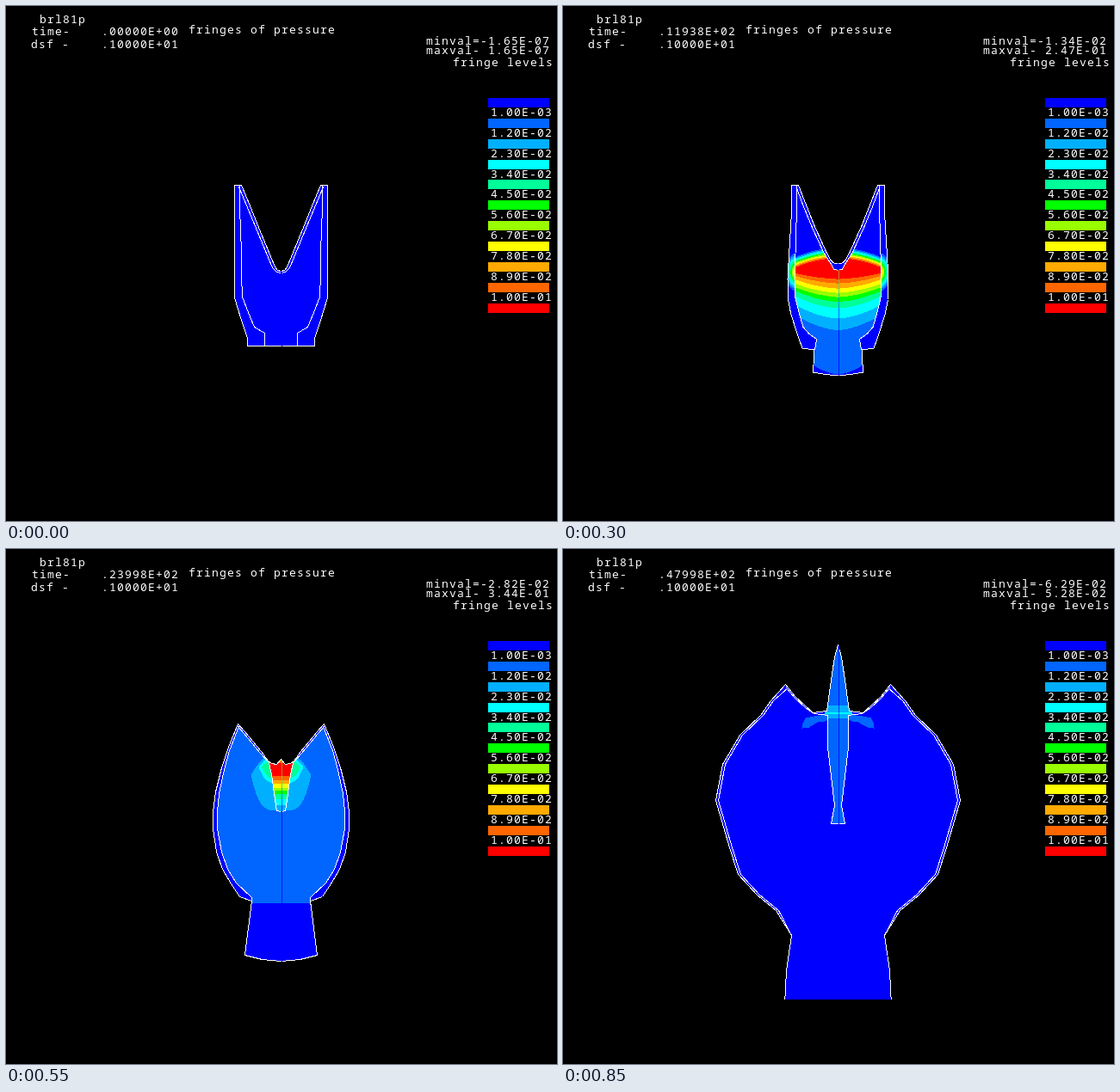
Animation, 640 px wide and 599 px high, one loop 0.9 s. Source, as an HTML page:

```html
<!DOCTYPE html>
<html lang="en">
<head>
<meta charset="utf-8">
<title>Fringes of pressure</title>
<style>
  html, body { margin: 0; width: 100%; height: 100%; overflow: hidden; background: #000; }
  svg { display: block; }
  text { font: 13px "Noto Sans Mono", "DejaVu Sans Mono", monospace; letter-spacing: 1.2px; fill: #fff; white-space: pre; }
  .line { fill: none; stroke: #fff; stroke-width: 1; }
</style>
</head>
<body>
<svg width="640" height="599" viewBox="0 0 640 599">
  <defs>
    <clipPath id="stage"><rect width="640" height="524"/></clipPath>
    <clipPath id="bodyClip"><path id="bodyEdge"/></clipPath>
    <clipPath id="chargeClip"><path id="chargeEdge"/></clipPath>
    <clipPath id="jetClip"><path id="jetEdge"/></clipPath>
  </defs>
  <g clip-path="url(#stage)" shape-rendering="crispEdges">
    <g transform="translate(319.5 .5)">
      <g id="half">
        <path id="body" fill="#00f"/>
        <g id="spot" clip-path="url(#bodyClip)"></g>
        <path id="charge" fill="#00f"/>
        <g id="bands" clip-path="url(#chargeClip)"></g>
        <g id="jet" clip-path="url(#jetClip)"></g>
        <path id="lines" class="line"/>
      </g>
      <use href="#half" transform="scale(-1 1)"/>
    </g>
  </g>
  <g id="legend"></g>
  <text x="39" y="20">brl81p</text>
  <text x="30" y="34">time-</text>
  <text x="111" y="34" id="time"></text>
  <text x="29" y="49">dsf -</text>
  <text x="111" y="49">.10000E+01</text>
  <text x="212" y="32">fringes of pressure</text>
  <text x="488" y="45" id="min"></text>
  <text x="488" y="56" id="max"></text>
  <text x="519" y="70">fringe levels</text>
</svg>
<script>
const $ = id => document.getElementById(id);
const colors = ['#00f', '#06f', '#00b0ff', '#0ff', '#00ff99', '#0f0', '#9f0', '#ff0', '#fa0', '#f60', '#f00'];
const none = Array(10).fill(150);
const flat = y => Array(10).fill(y);

// Case wall pushed inwards, ends kept on the wall
const inset = (p, g) => p.map((v, i) => i > p.length - 3 ? v : i === 1 ? v + g + 1 : i % 2 ? v : v - g);

// Key poses, 8 time units apart; points are (distance from axis, y).
// up: front [y, step per level, drop at edge]; low, edge: rear of each level on axis and at the wall
// jetUp, jetLow: the same for the jet
const keys = [];
const key = (shape, field) => keys.push({ ...shape, ...field });

const zone24 = [60,200, 75,240, 85,275, 85,295, 85,318, 85,337, 80,353, 75,371, 70,385, 45,411, 25,411, -1,412];
const cone = {
  top: [46,208, 36,232, 26,257, 19,274, 12,291, 7,303, 4,307, 0,308],
  slug: [49,210, 39,234, 29,258, 22,275, 15,292, 10,304, 7,307, 5,309, 0,310],
  zone: zone24, jetUp: [285, 0], jetLow: none
};

key({
  out: [54,208, 54,234, 54,260, 54,286, 54,312, 54,339, 50,352, 46,365, 39,386, 39,395, 19,395],
  wall: [48,208, 48,234, 47,260, 46,286, 46,312, 45,338, 38,356, 31,373, 24,377, 19,380, 19,395],
  tail: [19,395, 19,395, 10,395, 0,395], ...cone
}, {
  up: [397, 1, 6], pow: 2, spot: [30, 395, 0, 0],
  low: [430,425,423,420,418,416,414,412,411,410], edge: [430,425,423,420,418,416,414,412,411,410],
  info: [0, -1.65e-7, 1.65e-7]
});

key({
  out: [54,208, 54,234, 54,260, 54,286, 54,312, 54,339, 51,352, 48,364, 43,385, 40,396, 25,396],
  wall: [48,208, 48,234, 47,260, 46,286, 45,312, 44,338, 39,357, 35,374, 28,378, 23,381, 25,396],
  tail: [25,403, 25,410, 13,412, 0,413], ...cone
}, {
  up: [313, 1.4, 14], pow: 2, spot: [46, 350, 9, 15],
  low: [430,386,381,372,367,363,359,354,352,350], edge: [430,383,378,369,364,360,356,351,349,347],
  info: [7.9325, -1.45e-2, .157]
});

key({
  out: [54,208, 54,245, 57,270, 60,293, 63,322, 62,343, 59,361, 54,375, 48,388, 43,399, 30,403],
  wall: [48,208, 48,245, 51,270, 53,290, 56,322, 55,340, 51,358, 46,372, 39,384, 27,393, 29,403],
  tail: [31,420, 34,441, 17,444, 0,446],
  top: [46,208, 38,230, 29,253, 22,267, 16,279, 10,287, 6,290, 0,290],
  slug: [48,210, 41,232, 32,254, 25,268, 18,281, 9,291, 7,296, 5,302, 0,304]
}, {
  zone: zone24, up: [246, 1.3, 10], pow: 1.4, spot: [51, 268, 8, 14],
  low: [426,367,345,330,320,313,307,302,292,284], edge: [365,330,313,302,295,291,287,282,276,272],
  jetUp: [286, 0], jetLow: flat(304),
  info: [15.944, -1.22e-2, .337]
});

key({
  out: [50,203, 61,230, 69,254, 76,282, 79,305, 79,325, 75,352, 68,372, 58,389, 48,404, 34,409],
  wall: [49,206, 60,234, 66,256, 72,284, 74,305, 74,325, 69,352, 62,372, 52,388, 34,405, 34,409],
  tail: [38,440, 42,472, 22,477, 0,479],
  top: [50,203, 42,212, 33,223, 23,235, 15,246, 11,249, 5,250, 0,244],
  slug: [50,206, 43,214, 34,225, 24,237, 14,248, 11,262, 6,298, 5,304, 0,305]
}, {
  zone: zone24, up: [224, 4, 70], pow: 4, spot: [60, 230, 0, 0],
  low: [412,304,272,267,240,240,240,240,240,240], edge: [412,83,-70,-150,100,100,100,100,100,100],
  jetUp: [236, 1.2], jetLow: [330,306,297,290,284,280,277,272,268,263],
  info: [23.998, -2.82e-2, .344]
});

const out32 = [51,187, 63,203, 79,225, 92,257, 99,288, 100,313, 96,340, 88,368, 76,390, 56,412, 39,420];
key({
  out: out32, wall: inset(out32, 4),
  tail: [45,455, 50,505, 27,511, 0,513],
  top: [51,187, 45,197, 36,206, 24,213, 14,219, 8,217, 3,210, 0,198],
  slug: [50,190, 44,201, 36,209, 24,216, 15,220, 10,250, 5,293, 6,306, 0,307]
}, {
  zone: [36,208, 68,245, 85,275, 87,295, 74,318, 80,337, 57,353, 57,371, 74,375, 48,402, 36,391, -1,386],
  up: [199, 3, 85], pow: 4, spot: [60, 230, 0, 0],
  low: [386,236,230,226,150,150,150,150,150,150], edge: [386,-100,-300,-400,100,100,100,100,100,100],
  jetUp: [196, 2], jetLow: [330,300,262,246,240,236,234,231,228,225],
  info: [31.985, -6.17e-2, .165]
});

const gone = { up: [300, 0, 0], pow: 4, spot: [60, 230, 0, 0], low: none, edge: none };
const out40 = [55,171, 70,190, 85,208, 104,234, 116,262, 121,300, 112,343, 107,367, 91,394, 66,414, 47,433];
key({
  out: out40, wall: inset(out40, 3),
  tail: [51,470, 57,538, 30,546, 0,549],
  top: [55,171, 47,183, 37,195, 25,198, 15,200, 9,189, 3,169, 0,154],
  slug: [54,175, 46,187, 37,197, 25,200, 15,202, 11,235, 4,295, 8,313, 0,314]
}, {
  zone: [20,203, 40,208, 50,220, 53,240, 50,255, 53,264, 46,274, 36,280, 25,283, 18,283, 8,275, -1,270],
  ...gone, jetUp: [160, 8], jetLow: [330,248,225,206,202,150,150,150,150,150],
  info: [39.995, -9.17e-2, 5.69e-2]
});

const out48 = [61,157, 78,176, 90,193, 114,216, 134,250, 142,292, 126,347, 116,378, 94,402, 72,420, 54,449];
key({
  out: out48, wall: inset(out48, 3),
  tail: [60,490, 64,570, 33,578, 0,582],
  top: [61,157, 50,171, 38,182, 29,190, 13,188, 8,152, 4,125, 0,111],
  slug: [60,161, 50,173, 38,184, 28,191, 12,193, 12,230, 4,298, 8,319, 0,319]
}, {
  zone: [13,192, 28,194, 38,196, 41,202, 42,208, 34,207, 27,203, 22,200, 16,200, 12,198, 6,196, -1,196],
  ...gone, jetUp: [165, 8], jetLow: [330,196,191,150,150,150,150,150,150,150],
  info: [47.998, -6.29e-2, 5.28e-2]
});

const mix = (a, b, f) => Array.isArray(a) ? a.map((v, i) => mix(v, b[i], f)) : a + (b - a) * f;

function poseAt(t) {
  const i = Math.min(Math.floor(t / 8), keys.length - 2), pose = {};
  for (const k in keys[i]) pose[k] = mix(keys[i][k], keys[i + 1][k], t / 8 - i);
  return pose;
}

const reversed = p => {
  const r = [];
  for (let i = p.length - 2; i >= 0; i -= 2) r.push(p[i], p[i + 1]);
  return r;
};
const poly = p => 'M' + p.map(v => v.toFixed(1)).join(' ');
// Closed half shape that overlaps the axis a little
const area = (down, up) => poly([...down, -1, down.at(-1), -1, up.at(-1), ...reversed(up)]) + 'Z';

function addShapes(parent, tag, from, to) {
  const list = [];
  for (let i = from; i <= to; i++) {
    const el = document.createElementNS('http://www.w3.org/2000/svg', tag);
    el.setAttribute('fill', colors[i]);
    parent.append(el);
    list[i] = el;
  }
  return list;
}
const bands = addShapes($('bands'), 'path', 1, 10);
const jets = addShapes($('jet'), 'path', 1, 10);
const spots = addShapes($('spot'), 'ellipse', 1, 7);

function bandPath(s, i, t) {
  if (i === 1 && t >= 24) return poly([-1, 200, ...s.zone]) + 'Z';
  const front = [], rear = [];
  const lift = i === 1 ? Math.max(0, t - 16) * 20 : 0;
  for (let d = -1; d < 90; d += 3) {
    const q = Math.abs(d) / 53;
    const y = s.up[0] + s.up[1] * i + s.up[2] * q * q - lift;
    const low = s.low[i - 1], end = s.edge[i - 1];
    front.push(d, y);
    rear.push(d, Math.max(y, low - (low - end) * q ** s.pow));
  }
  return poly([...front, ...reversed(rear)]) + 'Z';
}

function jetPath(s, i) {
  const y = i === 1 ? 0 : s.jetUp[0] + s.jetUp[1] * i;
  const low = Math.max(y, s.jetLow[i - 1]);
  return poly([-1, y, 16, y, 16, low, -1, low]) + 'Z';
}

const exponent = e => 'E' + (e < 0 ? '-' : '+') + String(Math.abs(e)).padStart(2, '0');
function sci(v) {
  const [m, e] = v.toExponential(2).split('e');
  return m + exponent(+e);
}
function fortran(v) {
  const e = v ? Math.floor(Math.log10(v)) + 1 : 0;
  return (v / 10 ** e).toFixed(5).slice(1) + exponent(e);
}

function draw(t) {
  const s = poseAt(t);
  const set = (id, d) => $(id).setAttribute('d', d);
  const body = area([...s.out, ...s.tail], s.top);
  const charge = area([...s.wall, ...s.tail], s.slug);
  set('body', body);
  set('bodyEdge', body);
  set('charge', charge);
  set('chargeEdge', charge);
  set('jetEdge', area(s.slug, s.top));
  set('lines', poly([s.top[0], s.top[1], ...s.out, ...s.tail]) + [s.wall, s.top, s.slug].map(poly).join(''));
  for (let i = 1; i <= 10; i++) {
    bands[i].setAttribute('d', bandPath(s, i, t));
    jets[i].setAttribute('d', jetPath(s, i));
  }
  const [cx, cy, rx, ry] = s.spot;
  for (let i = 1; i <= 7; i++) {
    const k = 1.7 - i * .18;
    Object.entries({ cx, cy, rx: rx * k, ry: ry * k }).forEach(([n, v]) => spots[i].setAttribute(n, v));
  }
  const [time, min, max] = s.info;
  $('time').textContent = fortran(time);
  $('min').textContent = 'minval=' + sci(min);
  $('max').textContent = 'maxval- ' + sci(max);
}

$('legend').innerHTML = colors.map((c, i) => {
  const y = 107 + 23.85 * i;
  const level = i ? .012 + .011 * (i - 1) : .001;
  const label = i < 10 ? `<text x="563" y="${Math.round(y + 21)}">${sci(level)}</text>` : '';
  return `<rect x="560" y="${Math.round(y)}" width="71" height="11" fill="${c}"/>${label}`;
}).join('');

// 18 steps of 50 ms: 2 time units each up to 20, then 4
const start = performance.now();
let shown = -1;
function tick() {
  const n = Math.floor((performance.now() - start) % 900 / 50);
  if (n !== shown) draw(n <= 10 ? n * 2 : 20 + (n - 10) * 4);
  shown = n;
  requestAnimationFrame(tick);
}
tick();
</script>
</body>
</html>
```
